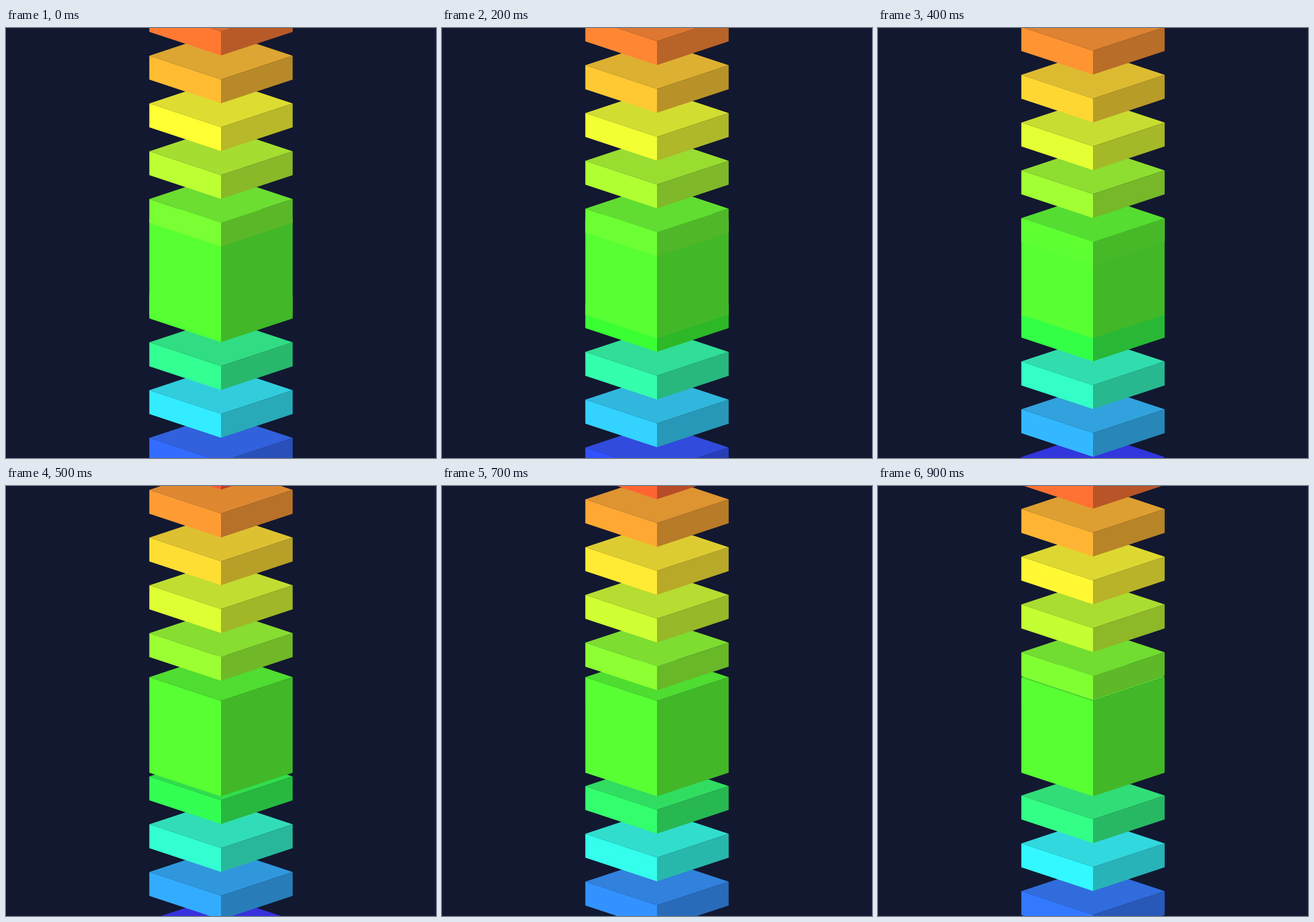
An HTML page with a canvas for the animation above (1 s loop, 748 by 748 pixels).

```html
<!DOCTYPE html>
<html lang="en">
<head>
<meta charset="utf-8">
<title>Rainbow slabs</title>
<style>
  html, body { margin: 0; width: 100%; height: 100%; overflow: hidden; background: #121830; }
  canvas { display: block; width: 748px; height: 748px; }
</style>
</head>
<body>
<canvas id="stage" width="748" height="748"></canvas>
<script>
const ctx = document.getElementById('stage').getContext('2d');
const SIZE = 748;
const LEFT = SIZE / 3, MID = SIZE / 2, RIGHT = SIZE * 2 / 3;
const DEPTH = 41.2;           // rise of a slanted edge
const PITCH = SIZE / 9;       // distance between slabs
const SLAB = SIZE / 18;
const CUBE_TOP = SIZE * 4 / 9;
const CUBE = SIZE * 2 / 9;
const CUBE_HUE = 109.5;
const LOOP = 1000, STEP = 100, PHASE = 0.42;

function face(color, ...points) {
  ctx.fillStyle = color;
  ctx.beginPath();
  for (const [x, y] of points) ctx.lineTo(x, y);
  ctx.fill();
}

// y is the height of the top face's left and right corners
function box(y, h, hue) {
  const front = y + DEPTH;
  face(`hsl(${hue}, 72%, 53%)`, [LEFT, y], [MID, y - DEPTH], [RIGHT, y], [MID, front]);
  face(`hsl(${hue}, 100%, 60%)`, [LEFT, y], [MID, front], [MID, front + h], [LEFT, y + h]);
  face(`hsl(${hue}, 64%, 44%)`, [RIGHT, y], [MID, front], [MID, front + h], [RIGHT, y + h]);
}

const hueAbove = y => 60 + (y - 131.3) * 0.237;
const hueBelow = y => 110.5 + (y - 463.8) * 0.4525;

function draw(ms) {
  const step = Math.floor((ms % LOOP) / STEP);
  const base = CUBE_TOP + (step * STEP / LOOP - PHASE) * PITCH;
  ctx.fillStyle = '#121830';
  ctx.fillRect(0, 0, SIZE, SIZE);

  // slabs leaving the cube lie behind it, slabs entering lie in front
  for (let i = 5; i >= 2; i--) box(base + i * PITCH, SLAB, hueBelow(base + i * PITCH));
  box(CUBE_TOP, CUBE, CUBE_HUE);
  for (let i = 0; i >= -6; i--) {
    const y = base + i * PITCH;
    if (y < CUBE_TOP) box(y, SLAB, hueAbove(y));
  }
}

function tick(now) {
  draw(now + 1);
  requestAnimationFrame(tick);
}
draw(0);
requestAnimationFrame(tick);
</script>
</body>
</html>
```
